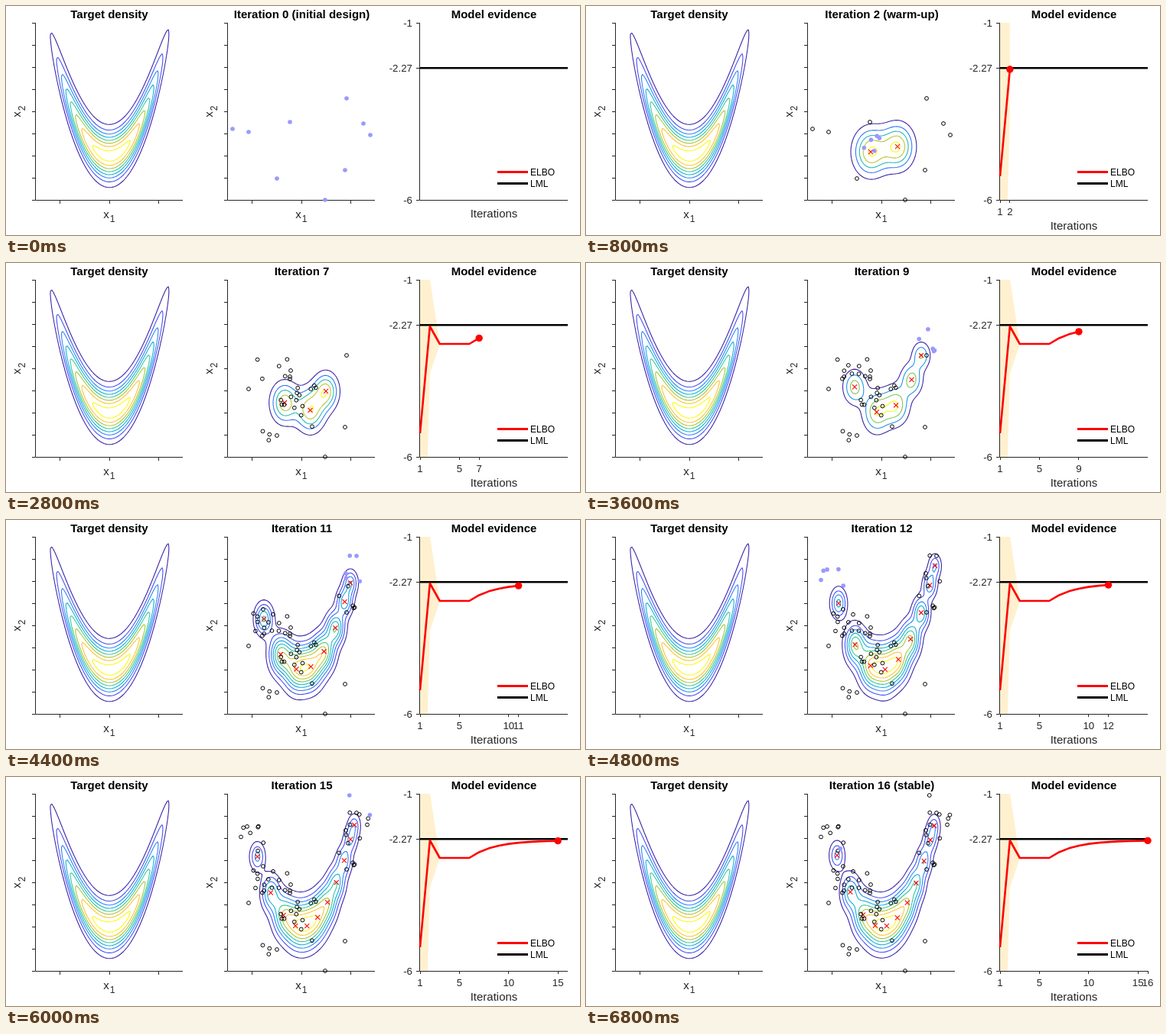
An HTML page with a canvas for the animation above (8000 ms loop, 750 by 300 pixels).

```html
<!DOCTYPE html>
<html lang="en">
<head>
<meta charset="utf-8">
<title>Variational inference</title>
<style>
  html, body { margin: 0; width: 100%; height: 100%; overflow: hidden; background: #fff; }
  canvas { display: block; }
</style>
</head>
<body>
<canvas id="stage" width="750" height="300"></canvas>
<script>
const ctx = document.getElementById('stage').getContext('2d');
const LOOP = 8000, STEP = 400, LAST = 16, WARMUP_END = 6;
const TOP = 22, BOTTOM = 254, WIDTH = 193;
const LEFT = 38, MIDDLE = 289, RIGHT = 541;
const UNIT_X = 32.25, UNIT_Y = 29, ORIGIN_Y = 196.5, CENTRE = 97;
const INK = '#262626', RED = '#f00', BLACK = '#000';
const FONT = '"Liberation Sans", Arial, sans-serif';

const lerp = (a, b, t) => a + (b - a) * t;
const random = n => { const v = Math.sin(n * 12.9898) * 43758.5453; return v - Math.floor(v); };
const jitter = n => random(n) * 2 - 1;

// Interpolates through rows of values.
function along(rows, position) {
  const i = Math.min(rows.length - 2, Math.floor(position));
  return rows[i].map((v, n) => lerp(v, rows[i + 1][n], position - i));
}

const palette = [[62,38,168], [71,84,244], [45,135,247], [16,177,213],
                 [55,200,151], [171,199,57], [254,195,56], [249,251,21]];
const colorAt = t => `rgb(${along(palette, t * (palette.length - 1)).map(Math.round)})`;

// Curved target density in its own units, and its ridge y = x * x on screen.
const target = (x, y) =>
  .1712 * Math.exp(-((x * x - y) ** 2) - (x - 1) ** 2 / 100 - (x * x + y * y) / 18);
const unitX = (px, panel) => (px - panel - CENTRE) / UNIT_X;
const unitY = py => (ORIGIN_Y - py) / UNIT_Y;
const ridgeY = px => ORIGIN_Y - UNIT_Y * unitX(px, MIDDLE) ** 2;

// How far the approximation reaches: iteration, left, right, spread, height ratio.
const reachKeys = [[4, 372, 407, 15, 1.38], [7, 364, 418, 12.6, 1.5], [9, 351, 438, 12, 1.5],
                   [12, 330, 456, 11, 1.9], [16, 328, 455, 11, 1.9]];
function reach(k) {
  const at = Math.max(k, reachKeys[0][0]);
  const i = Math.min(reachKeys.length - 2, reachKeys.filter(key => key[0] <= at).length - 1);
  const t = (at - reachKeys[i][0]) / (reachKeys[i + 1][0] - reachKeys[i][0]);
  const [, left, right, spread, ratio] = along(reachKeys, i + t);
  return { left, right, spread, ratio };
}

// Gaussians strung along the ridge, with a fixed total mass.
function mixture(k) {
  const { left, right, spread, ratio } = reach(k);
  const count = Math.max(2, Math.min(11, Math.round(3 + 1.2 * (k - 7))));
  const parts = Array.from({ length: count }, (_, i) => {
    const x = lerp(left, right, 1 - (1 - i / (count - 1)) ** 1.4);
    const u = unitX(x, MIDDLE), sx = spread / (1 + .2 * u * u);
    return { x, y: ridgeY(x), sx, sy: sx * ratio, peak: Math.sqrt(target(u, u * u)) };
  });
  const mass = parts.reduce((sum, p) => sum + 2 * Math.PI * p.sx * p.sy * p.peak, 0);
  for (const p of parts) p.peak *= .93 * UNIT_X * UNIT_Y / mass;
  return parts;
}

const initialDesign = [[296,161], [317,165], [371,152], [445,121], [467,154],
                       [476,169], [443,215], [354,226], [417,254]];

// Warm-up samples widen around the middle; later ones probe beyond alternate ends.
function samples(k) {
  if (k === 0) return initialDesign;
  if (k === 1 || k === WARMUP_END + 1) return [];
  const warm = k <= WARMUP_END, side = k % 2 ? 1 : -1;
  const end = side > 0 ? reach(k).right : reach(k).left;
  const [cx, cy, rx, ry] = warm ? [375, 175, 8 * k, 10 * k] : [end + 8 * side, ridgeY(end) - 22, 15, 24];
  return Array.from({ length: Math.min(5, LAST + 1 - k) }, (_, i) =>
    [cx + rx * jitter(k * 10 + i), Math.max(TOP + 2, cy + ry * jitter(k * 10 + i + 500))]);
}
const isTrimmed = ([x]) => x < 300 || x > 460;

function elbo(k) {
  if (k < 3) return k === 1 ? 223 : 83;
  return 106 - 23 * (1 - Math.exp(-.4 * Math.max(0, k - WARMUP_END)));
}
const deviation = k => k === 1 ? 395 : k === 2 ? 62 : 1;
const iterX = k => RIGHT + (k - 1) * WIDTH / (LAST - 1);

function line(color, width, ...xy) {
  ctx.strokeStyle = color;
  ctx.lineWidth = width;
  ctx.beginPath();
  for (let i = 0; i < xy.length; i += 2) ctx.lineTo(xy[i], xy[i + 1]);
  ctx.stroke();
}

function text(str, x, y, size = 15, align = 'center', style = '', color = INK) {
  ctx.font = `${style} ${size}px ${FONT}`;
  ctx.textAlign = align;
  ctx.fillStyle = color;
  ctx.fillText(str, x, y);
}

const title = (str, x) => text(str, x, 16, 15, 'center', 'bold', BLACK);

function circle(x, y, r, fill) {
  ctx.beginPath();
  ctx.arc(x, y, r, 0, 7);
  ctx.fillStyle = fill;
  ctx.strokeStyle = BLACK;
  ctx.lineWidth = 1;
  fill ? ctx.fill() : ctx.stroke();
}

// Marching squares; the level spacing is a round number that suits the peak.
function contours(density, x0) {
  const cell = 2, cols = 97, rows = 116, grid = [];
  for (let j = 0; j <= rows; j++) {
    grid.push(Array.from({ length: cols + 1 }, (_, i) => density(x0 + i * cell, TOP + j * cell)));
  }
  const peak = Math.max(...grid.flat());
  const step = peak < .2 ? .02 : peak < .4 ? .05 : .1;
  const count = Math.floor(peak / step);
  ctx.lineWidth = 1.1;
  ctx.lineCap = 'round';
  for (let n = 1; n <= count; n++) {
    const level = n * step;
    ctx.strokeStyle = colorAt(count > 1 ? (n - 1) / (count - 1) : 0);
    ctx.beginPath();
    for (let j = 0; j < rows; j++) for (let i = 0; i < cols; i++) {
      const corners = [[i, j], [i + 1, j], [i + 1, j + 1], [i, j + 1]];
      const hits = [];
      corners.forEach(([ax, ay], c) => {
        const [bx, by] = corners[(c + 1) % 4];
        const a = grid[ay][ax], b = grid[by][bx];
        if ((a < level) === (b < level)) return;
        const f = (level - a) / (b - a);
        hits.push([x0 + lerp(ax, bx, f) * cell, TOP + lerp(ay, by, f) * cell]);
      });
      for (let h = 0; h + 1 < hits.length; h += 2) {
        ctx.moveTo(...hits[h]);
        ctx.lineTo(...hits[h + 1]);
      }
    }
    ctx.stroke();
  }
  ctx.lineCap = 'butt';
}

function densityAxes(x) {
  line(INK, 1, x + .5, TOP, x + .5, BOTTOM + .5, x + WIDTH, BOTTOM + .5);
  for (let y = TOP + .5; y <= BOTTOM + 1; y += UNIT_Y) line(INK, 1, x - 4, y, x, y);
  for (let i = 0; i < 3; i++) {
    const tx = Math.round(x + 32 + 2 * UNIT_X * i) + .5;
    line(INK, 1, tx, BOTTOM, tx, BOTTOM + 5);
  }
  text('x', x + 93, 278);
  text('1', x + 101, 283, 12);
  ctx.save();
  ctx.translate(x - 19, 142);
  ctx.rotate(-Math.PI / 2);
  text('x', 0, 0);
  text('2', 8, 6, 12);
  ctx.restore();
}

function drawPosterior(k) {
  if (k > 0) {
    const parts = mixture(k);
    contours((px, py) => parts.reduce((sum, { x, y, sx, sy, peak }) =>
      sum + peak * Math.exp(-(((px - x) / sx) ** 2 + ((py - y) / sy) ** 2) / 2), 0), MIDDLE);
    for (const { x, y } of parts) {
      line(RED, 1.1, x - 3, y - 3, x + 3, y + 3);
      line(RED, 1.1, x - 3, y + 3, x + 3, y - 3);
    }
  }
  for (let born = 0; born <= k; born++) {
    const fresh = born === k || k === 1;
    for (const point of samples(born)) {
      if (born === 0 && k > WARMUP_END && isTrimmed(point)) continue;
      if (fresh) circle(...point, 2.8, '#9999ff');
      else circle(...point, 2.4);
    }
  }
}

function drawEvidence(k) {
  const steps = Array.from({ length: k }, (_, i) => i + 1);
  ctx.save();
  ctx.beginPath();
  ctx.rect(RIGHT, TOP, WIDTH + 1, BOTTOM - TOP);
  ctx.clip();
  ctx.fillStyle = '#fff0cf';
  ctx.beginPath();
  for (const n of steps) ctx.lineTo(iterX(n), elbo(n) - deviation(n));
  for (const n of [...steps].reverse()) ctx.lineTo(iterX(n), elbo(n) + deviation(n));
  ctx.fill();
  ctx.restore();

  line(INK, 1, RIGHT - .5, TOP, RIGHT - .5, BOTTOM + .5, RIGHT + WIDTH, BOTTOM + .5);
  for (const [label, y] of [['-1', TOP], ['-2.27', 81], ['-6', BOTTOM]]) {
    line(INK, 1, RIGHT - 5, y + .5, RIGHT - 1, y + .5);
    text(label, RIGHT - 10, y + 5, 13.3, 'right');
  }
  line(BLACK, 2.6, RIGHT, 81.3, RIGHT + WIDTH, 81.3);

  if (k > 0) {
    ctx.lineJoin = 'round';
    line(RED, 2.6, ...steps.flatMap(n => [iterX(n), elbo(n)]));
    circle(iterX(k), elbo(k), 4.7, RED);
    for (const n of steps.filter(n => n === 1 || n % 5 === 0 || n === k)) {
      const x = Math.floor(iterX(n)) + .5;
      line(INK, 1, x, BOTTOM, x, BOTTOM + 4);
      text(n, iterX(n), 274, 13.3);
    }
  }
  text('Iterations', RIGHT + WIDTH / 2, k ? 293 : 277);

  [['ELBO', RED], ['LML', BLACK]].forEach(([label, color], i) => {
    line(color, 2.8, 642, 217.5 + 15 * i, 682, 217.5 + 15 * i);
    text(label, 685, 222 + 15 * i, 12, 'left', '', BLACK);
  });
}

function stageNote(k, stable) {
  if (k === 0) return ' (initial design)';
  if (k < WARMUP_END) return ' (warm-up)';
  if (k === WARMUP_END) return ' (end of warm-up)';
  return stable ? ' (stable)' : '';
}

function draw(tick) {
  const k = Math.min(tick, LAST);
  ctx.fillStyle = '#fff';
  ctx.fillRect(0, 0, 750, 300);
  title('Target density', LEFT + CENTRE);
  title(`Iteration ${k}${stageNote(k, tick > LAST)}`, MIDDLE + CENTRE + .5);
  title('Model evidence', RIGHT + CENTRE - .5);
  densityAxes(LEFT);
  densityAxes(MIDDLE);
  contours((px, py) => target(unitX(px, LEFT), unitY(py)), LEFT);
  drawPosterior(k);
  drawEvidence(k);
}

let shown = -1;
function frame() {
  const tick = Math.min(Math.floor(performance.now() % LOOP / STEP), LAST + 1);
  if (tick !== shown) draw(shown = tick);
  requestAnimationFrame(frame);
}
frame();
</script>
</body>
</html>
```
